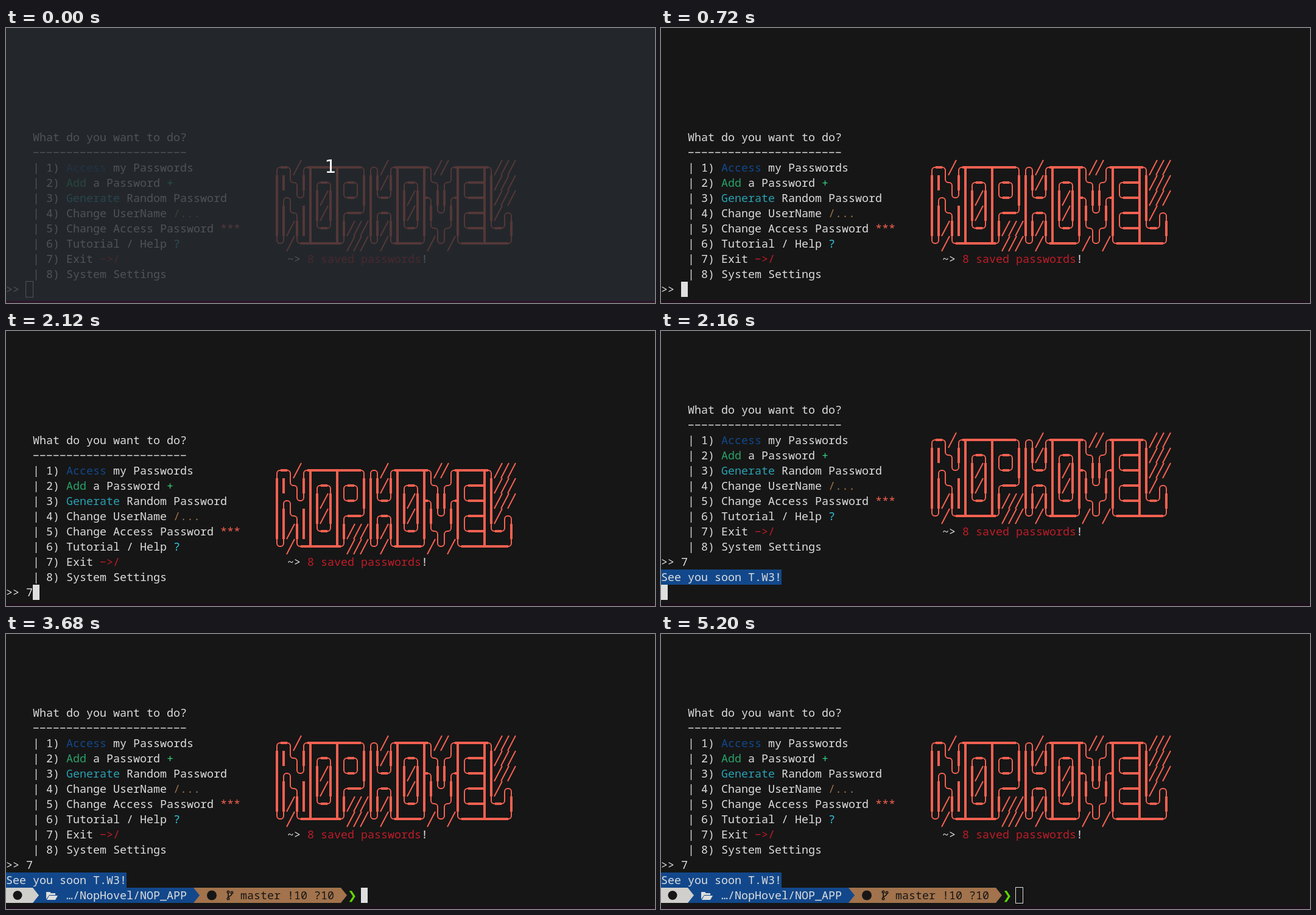
An HTML page with a canvas that plays this animation: 1066 px wide and 452 px high, repeating every 5880 ms.

```html
<!DOCTYPE html>
<html lang="en">
<head>
<meta charset="utf-8">
<style>
html, body { margin: 0; height: 100%; overflow: hidden; background: #161616; }
canvas { display: block; }
</style>
</head>
<body>
<canvas id="stage" width="1066" height="452"></canvas>
<script>
const ctx = document.getElementById('stage').getContext('2d');
const W = 1066, H = 452, CW = 11, RH = 25, LOOP = 5880;
const BG = '#161616', FG = '#dedede', BLUE = '#12488b', GREEN = '#26a269', LIME = '#33d17a',
  CYAN = '#2aa1b3', AQUA = '#33c7de', BROWN = '#a2734c', RED = '#c01c28', CORAL = '#f66151';

const MENU = [
  ['What do you want to do?'],
  ['−'.repeat(23)],
  ['| 1) ', FG, 'Access', BLUE, ' my Passwords'],
  ['| 2) ', FG, 'Add', GREEN, ' a Password ', FG, '+', LIME],
  ['| 3) ', FG, 'Generate', CYAN, ' Random Password'],
  ['| 4) Change UserName ', FG, '/...', BROWN],
  ['| 5) Change Access Password ', FG, '***', CORAL],
  ['| 6) Tutorial / Help ', FG, '?', AQUA],
  ['| 7) Exit ', FG, '−>/', RED],
  ['| 8) System Settings'],
];

const BANNER = [
  '╭━╮╱╭┳━━━┳━━━╮╭╮╱╭┳━━━┳╮╱╱╭┳━━━┳╮╱╱╱',
  '┃┃╰╮┃┃╭━╮┃╭━╮┃┃┃╱┃┃╭━╮┃╰╮╭╯┃╭━━┫┃╱╱╱',
  '┃╭╮╰╯┃┃╱┃┃╰━╯┃┃╰━╯┃┃╱┃┣╮┃┃╭┫╰━━┫┃╱╱╱',
  '┃┃╰╮┃┃┃╱┃┃╭━━╯┃╭━╮┃┃╱┃┃┃╰╯┃┃╭━━┫┃╱╭╮',
  '┃┃╱┃┃┃╰━╯┃┃╱╱╱┃┃╱┃┃╰━╯┃╰╮╭╯┃╰━━┫╰━╯┃',
  '╰╯╱╰━┻━━━┻╯╱╱╱╰╯╱╰┻━━━╯╱╰╯╱╰━━━┻━━━╯',
];
const ARMS = { '━': 'LR', '┃': 'UD', '┳': 'LRD', '┻': 'LRU', '┣': 'UDR', '┫': 'UDL' };
const CORNERS = { '╭': [1, 1], '╮': [-1, 1], '╰': [1, -1], '╯': [-1, -1] };

function rect(x, y, w, h, color) {
  ctx.fillStyle = color;
  ctx.fillRect(x, y, w, h);
}

function shape(points, color) {
  ctx.fillStyle = color;
  ctx.beginPath();
  points.forEach(([x, y]) => ctx.lineTo(x, y));
  ctx.fill();
}

function dot(x, y, r, color) {
  ctx.fillStyle = color;
  ctx.beginPath();
  ctx.arc(x, y, r, 0, 7);
  ctx.fill();
}

// Parts alternate between text and colour.
function print(col, top, ...parts) {
  ctx.font = '18.33px "Noto Sans Mono", monospace';
  for (let i = 0; i < parts.length; i += 2) {
    ctx.fillStyle = parts[i + 1] || FG;
    ctx.fillText(parts[i], col * CW, top + 19);
    col += parts[i].length;
  }
}

function boxGlyph(ch, x, y) {
  const cx = x + 5, cy = y + 12;
  if (ARMS[ch]) {
    for (const arm of ARMS[ch]) {
      if (arm === 'L') ctx.fillRect(x, cy - 2, 7, 4);
      if (arm === 'R') ctx.fillRect(cx - 2, cy - 2, 8, 4);
      if (arm === 'U') ctx.fillRect(cx - 2, y, 4, 14);
      if (arm === 'D') ctx.fillRect(cx - 2, cy - 2, 4, 15);
    }
    return;
  }
  ctx.beginPath();
  if (ch === '╱') {
    ctx.moveTo(x - 1, y + RH);
    ctx.lineTo(x + CW + 1, y);
  } else {
    const [dx, dy] = CORNERS[ch];
    const endX = dx > 0 ? x + CW : x, endY = dy > 0 ? y + RH : y;
    ctx.moveTo(cx, endY);
    ctx.arcTo(cx, cy, endX, cy, 5);
    ctx.lineTo(endX, cy);
  }
  ctx.stroke();
}

function drawMenu(top) {
  MENU.forEach((parts, i) => print(4, top + i * RH, ...parts));
  ctx.fillStyle = ctx.strokeStyle = CORAL;
  ctx.lineWidth = 2;
  BANNER.forEach((line, r) => [...line].forEach((ch, c) =>
    boxGlyph(ch, (40 + c) * CW, top + (r + 2) * RH)));
  print(42, top + 8 * RH, '~> ', FG, '8 saved passwords', RED, '!');
}

function segment(from, to, color) {
  rect(from, 417, to - from, RH, color);
  shape([[to, 417], [to + 10, 429.5], [to, 442]], color);
}

function drawPrompt() {
  segment(308, 550, BROWN);
  segment(44, 308, BLUE);
  segment(0, 44, '#d0cfcc');
  dot(19, 429.5, 7.5, BG);
  shape([[66, 436], [66, 424], [72, 424], [74, 426], [81, 426], [81, 429], [71, 429]], FG);
  shape([[71, 430], [85, 430], [81, 437], [67, 437]], FG);
  print(9, 417, '…/NopHovel/NOP_APP');
  dot(338, 429.5, 8, BG);

  // Branch icon
  ctx.strokeStyle = BG;
  ctx.lineWidth = 1.6;
  ctx.beginPath();
  ctx.moveTo(365, 425);
  ctx.lineTo(365, 435);
  ctx.moveTo(371, 426);
  ctx.quadraticCurveTo(371, 430, 365, 432);
  ctx.stroke();
  for (const [x, y] of [[365, 424], [365, 435], [371, 425]]) {
    ctx.beginPath();
    ctx.arc(x, y, 1.7, 0, 7);
    ctx.fillStyle = BROWN;
    ctx.fill();
    ctx.stroke();
  }
  print(35, 417, 'master !10 ?10', BG);
  print(51, 417, '❯', '#5fd700');
}

function drawCursor(col, style) {
  if (style === 'block') rect(col * CW, 417, CW, RH, FG);
  if (style === 'outline') {
    ctx.strokeStyle = FG;
    ctx.lineWidth = 1;
    ctx.strokeRect(col * CW - 0.5, 416.5, 12, 26);
  }
}

// Each entry: start time, cursor column, cursor style.
const CURSOR = [
  [0, 3, 'outline'], [80, 3, 'block'], [640, 3], [720, 3, 'block'],
  [1040, 4, 'block'], [1600, 4], [2120, 4, 'block'],
  [2160, 0, 'block'], [2720, 0], [3320, 0, 'block'],
  [3680, 53, 'block'], [3920, 53], [4520, 53, 'block'], [5120, 53], [5200, 53, 'outline'],
];

function draw(t) {
  const done = t >= 2160;
  rect(0, 0, W, H, BG);
  drawMenu(done ? 117 : 167);
  print(0, done ? 367 : 417, t < 1040 ? '>>' : '>> 7');
  if (done) {
    rect(0, 392, 198, RH, BLUE);
    print(0, 392, 'See you soon T.W3!');
  }
  if (t >= 3680) drawPrompt();
  const [, col, style] = CURSOR.findLast(([start]) => t >= start);
  drawCursor(col, style);

  const countdown = t < 40;
  if (countdown) {
    rect(0, 0, W, H, 'rgba(39,44,49,.78)');
    ctx.font = '30px "DejaVu Sans", sans-serif';
    ctx.textAlign = 'center';
    ctx.fillStyle = '#fff';
    ctx.fillText('1', 533, 238);
    ctx.textAlign = 'left';
  }
  rect(0, 448, W, 4, countdown ? '#2a1829' : '#1c0f1b');
}

const begin = performance.now();
function tick() {
  draw((performance.now() - begin) % LOOP);
  requestAnimationFrame(tick);
}
tick();
</script>
</body>
</html>
```
